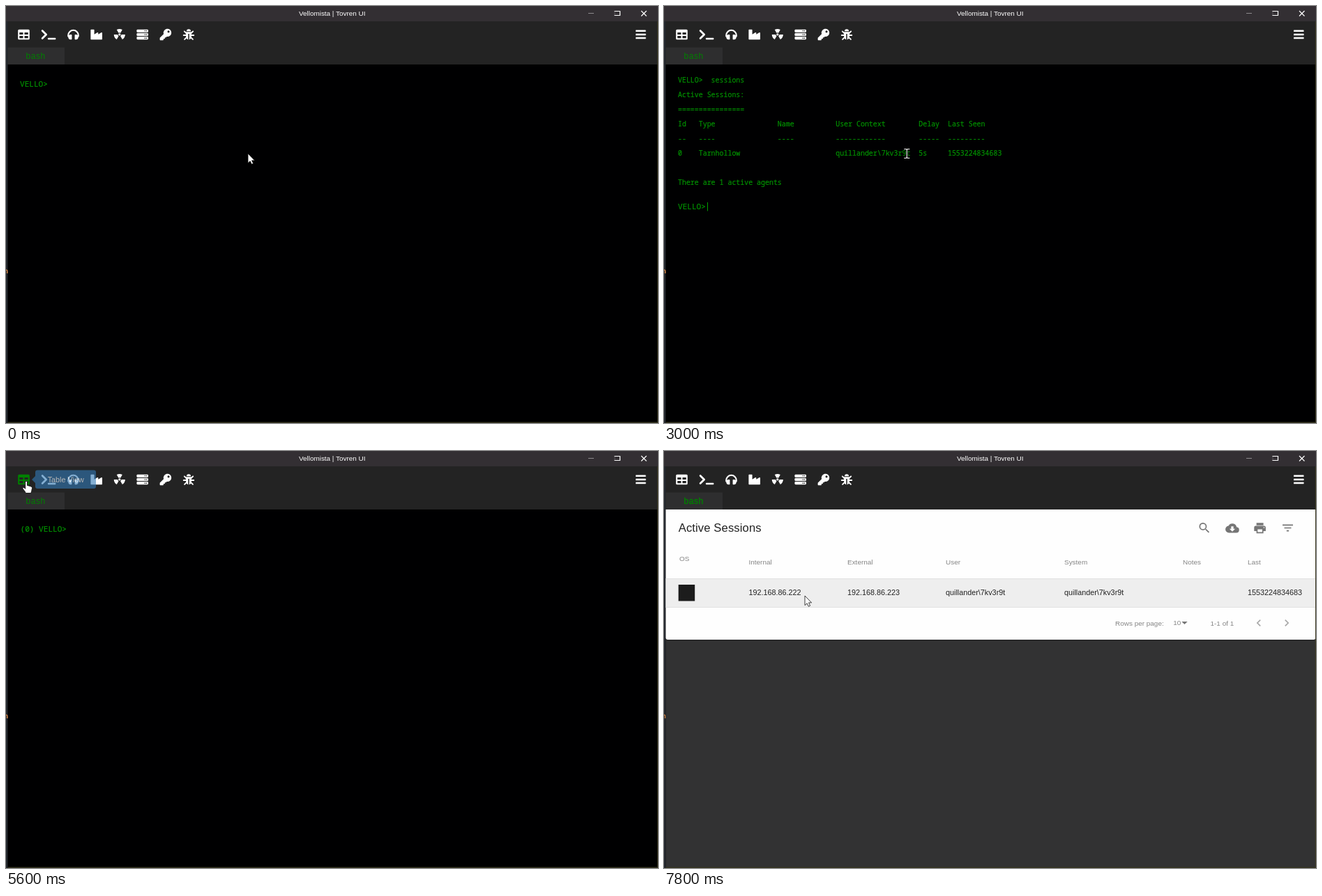
These frames come from a looping animation (935x599 px, 8 s). An HTML page:

```html
<!DOCTYPE html>
<html lang="en">
<head>
<meta charset="utf-8">
<title>Console</title>
<style>
  html, body { margin: 0; width: 100%; height: 100%; overflow: hidden; background: #000; }
  svg { display: block; width: 935px; height: 599px; }
  text { font-family: "Liberation Sans", Arial, sans-serif; white-space: pre; }
  .mono text { font-family: "Noto Sans Mono", "DejaVu Sans Mono", monospace; fill: #009200; stroke: #009200; stroke-width: .2px; }
  .out text, .typed { font-size: 9.93px; }
  .prompt { font-size: 11.08px; }
  .head { font-size: 9.96px; fill: #858585; }
  .cell { font-size: 10.8px; fill: #222; }
</style>
</head>
<body>
<svg id="stage" viewBox="0 0 935 599" xmlns="http://www.w3.org/2000/svg"></svg>
<script>
const LOOP = 8000, STEP = 200, CHAR = 5.957;
const USER = 'quillander\\7kv3r9t', SEEN = '1553224834683', PROMPT = 'VELLO>';

const text = (x, y, s, attrs = '') => `<text x="${x}" y="${y}" ${attrs}>${s.replace(/>/g, '&gt;')}</text>`;
const rect = (x, y, w, h, fill, attrs = '') =>
  `<rect x="${x}" y="${y}" width="${w}" height="${h}" fill="${fill}" ${attrs}/>`;
const path = (d, attrs = '') => `<path d="${d}" ${attrs}/>`;
const group = (id, body, attrs = '') => `<g id="${id}" ${attrs}>${body}</g>`;

// Toolbar icons live in a 512 unit box, action icons in a 24 unit box.
const icon = (x, body, id = '') =>
  `<g ${id && `id="${id}"`} fill="#fff" fill-rule="evenodd" transform="translate(${x} 32.7) scale(.0324)">${body}</g>`;
const action = (cx, cy, d, fill = '#757575') =>
  path(d, `fill="${fill}" fill-rule="evenodd" transform="translate(${cx - 9.96} ${cy - 9.96}) scale(.83)"`);

function radiation() {
  const at = (r, deg) => {
    const a = deg * Math.PI / 180;
    return `${(256 + r * Math.cos(a)).toFixed(1)} ${(256 + r * Math.sin(a)).toFixed(1)}`;
  };
  const blade = a => path(`M${at(82, a)}L${at(248, a)}A248 248 0 0 1 ${at(248, a + 60)}L${at(82, a + 60)}A82 82 0 0 0 ${at(82, a)}z`);
  return [0, 120, 240].map(blade).join('') + '<circle cx="256" cy="256" r="50"/>';
}

function server() {
  const dot = (x, y) => `<circle cx="${x}" cy="${y}" r="25" fill="#232323"/>`;
  return [32, 192, 352].map(y =>
    rect(0, y, 512, 128, '#fff', 'rx="44"') + dot(368, y + 64) + dot(436, y + 64)).join('');
}

const pane = (x, y) => `M${x} ${y}h160v96h-160z`;
const bug = path('M160 112a96 96 0 0 1 192 0z') +
  path('M136 144h240v192a120 144 0 0 1-240 0z') +
  path('M32 288H480M66 114l80 80M446 114l-80 80M74 470l80-80M438 470l-80-80',
    'stroke="#fff" stroke-width="58" stroke-linecap="round"') +
  path('M256 224V490', 'stroke="#232323" stroke-width="48"');

const toolbar =
  icon(17.2, path('M48 32H464a48 48 0 0 1 48 48V432a48 48 0 0 1-48 48H48a48 48 0 0 1-48-48V80a48 48 0 0 1 48-48z' +
    pane(64, 160) + pane(288, 160) + pane(64, 320) + pane(288, 320)), 'tableIcon') +
  icon(50.6, path('M46 84L218 256L46 428', 'fill="none" stroke="#fff" stroke-width="84" stroke-linejoin="round" stroke-linecap="round"') +
    rect(288, 400, 352, 80, '#fff', 'rx="24"')) +
  icon(88.2, path('M32 330V288a224 224 0 0 1 448 0V330', 'fill="none" stroke="#fff" stroke-width="64" stroke-linecap="round"') +
    path('M168 256a24 24 0 0 1 24 24V456a24 24 0 0 1-24 24H144a112 112 0 0 1 0-224zM344 256a24 24 0 0 0-24 24V456a24 24 0 0 0 24 24H368a112 112 0 0 0 0-224z')) +
  icon(121.4, path('M475 164L336 252V184c0-19-21-30-37-20L160 252V56a24 24 0 0 0-24-24H24A24 24 0 0 0 0 56V456a24 24 0 0 0 24 24H488a24 24 0 0 0 24-24V184c0-19-21-30-37-20z')) +
  icon(154.5, radiation()) +
  icon(187.4, server()) +
  icon(220.6, path('M512 176A176 176 0 0 1 303 349L279 376Q272 384 261 384H224V424a24 24 0 0 1-24 24H160V488a24 24 0 0 1-24 24H24a24 24 0 0 1-24-24V410Q0 400 7 393L169 231A176 176 0 1 1 512 176zM336 128a48 48 0 1 0 96 0a48 48 0 1 0-96 0z')) +
  icon(253.7, bug) +
  [34.6, 39.7, 44.8].map(y => rect(903, y, 14.5, 2.5, '#fff', 'rx=".5"')).join('');

const chrome =
  rect(0, 0, 935, 599, '#000001') +
  rect(0, 0, 935, 22, '#332f33') +
  rect(0, 22, 935, 62, '#232323') +
  rect(0, 22, 2.5, 577, '#24282e') +
  rect(2.5, 59.5, 81.5, 24.5, '#2e2e2f') +
  text(467.7, 14.2, 'Vellomista | Tovren UI', 'font-size="9.92" fill="#fff" text-anchor="middle"') +
  path('M835 10.5h8', 'stroke="#8d8a8d"') +
  path('M873 7v7', 'stroke="#5c585c"') +
  path('M872.5 7.5h8V13.5h-8', 'fill="none" stroke="#fff" stroke-width="1.2"') +
  path('M911 7l7.5 7.5M918.5 7l-7.5 7.5', 'stroke="#fff" stroke-width="1.2"') +
  text(28.6, 76, 'bash', 'id="tab" font-size="12" letter-spacing=".5" fill="#008000" stroke="#008000" stroke-width="0"') +
  path('M0 379.3q1.8-.5 1.8 1.7v3', 'fill="none" stroke="#c87f45" stroke-width="1.6"') +
  group('plus', path('M90 66.5h8.5a2 2 0 0 1 2 2v8a2 2 0 0 1-2 2H90a2 2 0 0 1-2-2v-8a2 2 0 0 1 2-2zM91.5 72.5h5.5M94.25 69.7v5.6',
    'fill="none" stroke="#5a5a5a"'));

const columns = [[0, 'Id'], [5, 'Type'], [24, 'Name'], [38, 'User Context'], [58, 'Delay'], [65, 'Last Seen']];
const fields = cells => cells.reduce((line, s, i) => line.padEnd(columns[i][0]) + s, '');
const titles = columns.map(c => c[1]);
const listing = [
  PROMPT + '  sessions',
  'Active Sessions:',
  '='.repeat(16),
  fields(titles),
  fields(titles.map(s => '-'.repeat(s.length))),
  fields(['0', 'Tarnhollow', '', USER, '5s', SEEN]),
  '',
  'There are 1 active agents'
];

const terminal = group('terminal',
  group('listing', listing.map((s, i) => text(20, 109.5 + 21 * i, s)).join(''), 'class="out"') +
  text(20, 116, PROMPT, 'id="prompt" class="prompt"') +
  text(62, 116, '', 'id="typed" class="typed"') +
  rect(0, 0, 1, 12.5, '#00a000', 'id="caret"'), 'class="mono"');

const heads = [[121.5, 'Internal'], [263, 'External'], [404, 'User'], [574, 'System'], [744, 'Notes'], [837, 'Last']];
const cells = [[121.5, '192.168.86.222'], [263, '192.168.86.223'], [404, USER], [574, USER], [837, SEEN]];

const table = group('table',
  rect(2.5, 84, 932, 515, '#323233') +
  rect(2.5, 100, 932, 172.5, '#262627', 'rx="3"') +
  path('M2.5 84H934.5V268a3 3 0 0 1-3 3H5.5a3 3 0 0 1-3-3z', 'fill="#fefefe"') +
  rect(2.5, 183.5, 932, 41, '#eeeeee', 'id="hover"') +
  path('M2.5 183.5h932M2.5 224.5h932', 'stroke="#e0e0e0"') +
  text(20.7, 116.3, 'Active Sessions', 'font-size="16.6" letter-spacing=".125" fill="#222"') +
  text(22, 157.5, 'OS', 'class="head"') +
  heads.map(([x, s]) => text(x, 163.2, s, 'class="head"')).join('') +
  cells.map(([x, s]) => text(x, 207, s, 'class="cell"')).join('') +
  rect(20.7, 192, 23.5, 23.5, '#1c1c1c') +
  action(775, 110.5, 'M15.5 14h-.8l-.3-.3A6.5 6.5 0 1 0 13.7 14.4l.3.3v.8l5 5L20.5 19zM9.5 14a4.5 4.5 0 1 1 0-9a4.5 4.5 0 0 1 0 9z') +
  action(815, 110.8, 'M19.35 10.04A7.5 7.5 0 0 0 5.35 8.04A6 6 0 0 0 6 20H19a5 5 0 0 0 .35-9.96zM17 13l-5 5-5-5h3V9h4v4z') +
  action(854.6, 110.8, 'M19 8H5a3 3 0 0 0-3 3v6h4v4h12v-4h4v-6a3 3 0 0 0-3-3zM16 19H8v-5h8zM19 12a1 1 0 1 1 0-2a1 1 0 0 1 0 2zM18 3H6v4h12z') +
  action(894.5, 110.5, 'M10 18h4v-2h-4zM3 6v2h18V6zM6 13h12v-2H6z') +
  text(647, 250.8, 'Rows per page:', 'class="head"') +
  text(730.3, 250.3, '10', 'class="head"') +
  action(746.5, 246.6, 'M7 10l5 5 5-5z') +
  text(783.5, 250.8, '1-1 of 1', 'class="head"') +
  action(853, 247, 'M15.4 7.4L14 6l-6 6 6 6 1.4-1.4L10.8 12z', '#a8a8a8') +
  action(893, 247, 'M8.6 7.4L10 6l6 6-6 6-1.4-1.4L13.2 12z', '#a8a8a8'));

const tooltip = group('tip',
  path('M45 27.5H126a3 3 0 0 1 3 3V51a3 3 0 0 1-3 3H45a3 3 0 0 1-3-3V46L37 41l5-5V30.5a3 3 0 0 1 3-3z', 'fill="#337ab7" fill-opacity=".9"') +
  text(85.7, 44.6, 'Table View', 'font-size="10.8" fill="#fff" text-anchor="middle"'));

const edges = rect(934, 22, 1, 577, '#39371f') + rect(2.5, 597.6, 932.5, 1.4, '#35341f');

const beam = 'M-4 -6.5h3l1 1l1-1h3M0 -5.5V5.5M-4 6.5h3l1-1l1 1h3';
const pointers =
  group('arrow', path('M0 0V13.6L3.1 10.8L5.3 15.3L7.6 14.2L5.5 9.9H9.6z', 'fill="#fff" stroke="#111" stroke-width=".8"')) +
  group('beam', path(beam, 'fill="none" stroke="#000" stroke-width="3"') +
    path(beam, 'fill="none" stroke="#fff" stroke-width="1.1"')) +
  group('hand', path('M-1.3 1.2a1.4 1.4 0 0 1 2.8 0V6l2.2.5 2.2.6 1.8.9q1 .6.8 2L7.7 14 6.8 17H-.6L-2 14.4-5 10.6q-.6-1.6.8-1.9 1 0 2.9 2z',
    'fill="#fff" stroke="#111" stroke-width=".9"'));

const stage = document.getElementById('stage');
stage.innerHTML = chrome + toolbar + terminal + table + tooltip + edges + pointers;
const el = id => document.getElementById(id);
const show = (id, on) => el(id).setAttribute('display', on ? 'inline' : 'none');
const set = (id, attrs) => { for (const k in attrs) el(id).setAttribute(k, attrs[k]); };

// Typed input: [time, text, caret shown]
const typing = [
  [0, '', 0], [800, '', 1], [1000, 's', 1], [1200, 'se', 1], [1400, 'ses', 1], [1600, 'sess', 1],
  [1800, 'sess', 0], [2000, 'sessi', 1], [2200, 'sessio', 1], [2400, 'sessions', 1],
  [2800, '', 0], [3000, '', 1], [3200, 'u', 1], [3400, 'use', 1], [3800, 'use 0', 1],
  [4000, '', 1], [4200, '', 0]
];
// Pointer path: [time, x, y]
const route = [
  [0, 347, 212], [4400, 347, 212], [4600, 300, 180], [4800, 158, 96], [5000, 82, 56],
  [5200, 52, 50], [5400, 29, 43.5], [6800, 29, 43.5], [7000, 48, 72], [7400, 165, 178],
  [7600, 202, 208], [8000, 202, 208]
];

const latest = (list, t) => list.filter(k => k[0] <= t).pop();
const clamp = v => Math.max(0, Math.min(1, v));

function pointerAt(t) {
  const i = Math.max(1, route.findIndex(k => k[0] >= t));
  const [a, b] = [route[i - 1], route[i]];
  const p = clamp((t - a[0]) / (b[0] - a[0]));
  return [a[1] + (b[1] - a[1]) * p, a[2] + (b[2] - a[2]) * p];
}

function draw(time) {
  const t = Math.floor((time % LOOP) / STEP) * STEP;
  const listed = t >= 2800 && t < 4000;
  const inSession = t >= 4000;
  const tabled = t >= 6600;
  const onIcon = t >= 5400 && t < 7000;

  const [, input, caret] = latest(typing, t);
  const base = listed ? 292 : 116;
  const left = inSession ? 88.5 : 62;
  el('prompt').textContent = inSession ? '(0) ' + PROMPT : PROMPT;
  el('typed').textContent = input;
  set('prompt', { x: inSession ? 20.5 : 20, y: base });
  set('typed', { x: left, y: base });
  set('caret', { x: left + input.length * CHAR, y: base - 10 });
  show('caret', caret);
  show('listing', listed);
  show('terminal', !tabled);
  show('table', tabled);
  show('plus', t >= 4800 && t < 5200);

  const [x, y] = pointerAt(t);
  const shape = onIcon ? 'hand' : listed ? 'beam' : 'arrow';
  for (const id of ['arrow', 'beam', 'hand']) show(id, id === shape);
  set(shape, { transform: shape === 'beam' ? `translate(${x + 1.3} ${y})` : `translate(${x} ${y})` });
  show('hover', tabled && y > 183 && y < 224);

  set('tableIcon', { fill: onIcon ? '#008000' : '#fff' });
  set('tip', { opacity: clamp((t - 5400) / 300) * clamp((7200 - t) / 300) });
  set('tab', { 'stroke-width': tabled ? 0.4 : 0 });
}

const start = performance.now();
function frame() {
  draw(performance.now() - start);
  requestAnimationFrame(frame);
}
draw(0);
requestAnimationFrame(frame);
</script>
</body>
</html>
```
